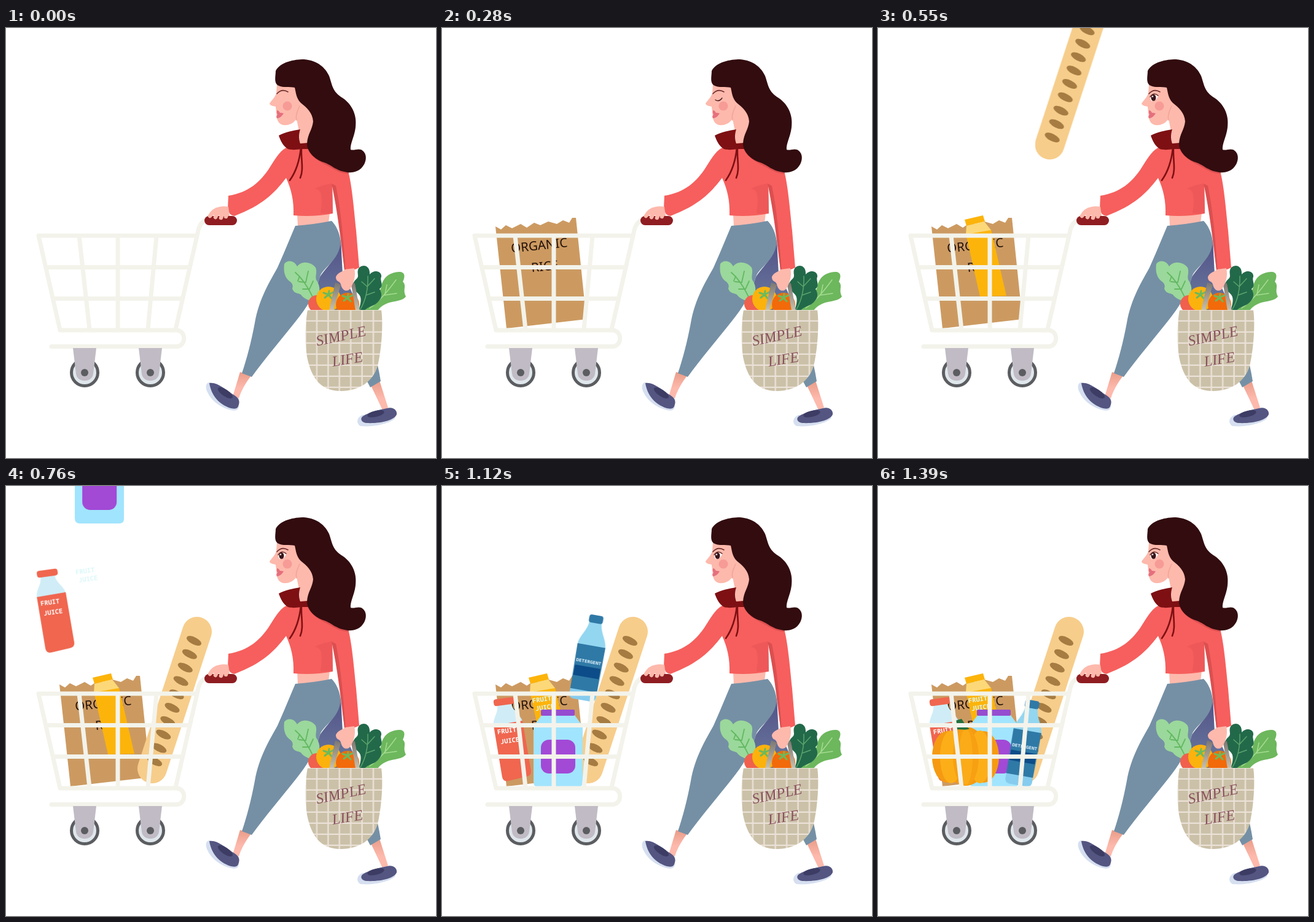
These frames come from a looping animation (700x700 px, 1.62 s). An HTML page:

```html
<!DOCTYPE html>
<html lang="en">
<head>
<meta charset="utf-8">
<title>Grocery shopping</title>
<style>
html, body { margin: 0; width: 100%; height: 100%; overflow: hidden; background: #fff; }
svg { display: block; width: 100vw; height: 100vh; }
text { text-anchor: middle; }

.skin { fill: #fdb9ac; }
.top { fill: #f65f5d; }
.top-dark { fill: #dc4f50; }
.bow { fill: #7e1013; }
.shoe { fill: #545581; }
.shoe-in { fill: #3c3c64; }
.sole { fill: #d5dff0; }
.line { fill: none; stroke-linecap: round; stroke-linejoin: round; }
.wire { stroke: #f3f3eb; stroke-width: 7; }
.mono { font-family: "Noto Sans Mono", monospace; font-weight: 600; }
.label { font-size: 10.5px; }
.hand { font-family: "Noto Sans", sans-serif; font-size: 20.5px; font-weight: 500; fill: #24120a; }
.script { font-family: "Liberation Serif", serif; font-style: italic; font-size: 24px; fill: #88505c; }

/* Each item drops in steps of 30 ms within the 1620 ms loop. */
.item, .eye { animation: 1620ms steps(7) infinite; }
.rice { animation-name: rice; }
.carton { animation-name: carton; }
.bread { animation-name: bread; animation-timing-function: steps(8); }
.bottle { animation-name: bottle; }
.pack { animation-name: pack; }
.soap { animation-name: soap; animation-timing-function: steps(11); }
.pumpkin { animation-name: pumpkin; animation-timing-function: steps(8); }
.eye { animation-timing-function: step-end; }
.closed { animation-name: closed; }
.open { animation-name: open; }

@keyframes rice {
  0%, 2.469% { transform: translate(0, -490px); }
  15.432%, to { transform: translate(0, 0); }
}
@keyframes carton {
  0%, 17.283% { transform: translate(0, -450px); }
  30.246%, to { transform: translate(0, 0); }
}
@keyframes bread {
  0%, 26.543% { transform: translate(83px, -540px); }
  41.358%, to { transform: translate(0, 0); }
}
@keyframes bottle {
  0%, 39.506% { transform: translate(-79px, -488px); }
  52.469%, to { transform: translate(0, 0); }
}
@keyframes pack {
  0%, 45.061% { transform: translate(-43px, -500.5px); }
  58.024%, to { transform: translate(0, 0); }
}
@keyframes soap {
  0%, 54.32% { transform: translate(0, -508px); }
  74.691%, to { transform: translate(0, 0); }
}
@keyframes pumpkin {
  0%, 70.987% { transform: translate(0, -489px); }
  85.802%, to { transform: translate(0, 0); }
}
@keyframes closed {
  0%, 24.691% { opacity: 0; }
  4.32% { opacity: 1; }
  to { opacity: 0; }
}
@keyframes open {
  0% { opacity: 0; }
  24.691%, to { opacity: 1; }
}
</style>
</head>
<body>
<svg viewBox="0 0 700 700">
  <defs>
    <linearGradient id="thigh" x1="0" y1="0" x2="0" y2="1">
      <stop offset=".05" stop-color="#55568a"/>
      <stop offset=".4" stop-color="#66749a"/>
      <stop offset=".8" stop-color="#7590a5"/>
    </linearGradient>
    <linearGradient id="ankle" x1="0" y1="0" x2="0" y2="1">
      <stop offset="0" stop-color="#e99c88"/>
      <stop offset=".6" stop-color="#fdb9ac"/>
    </linearGradient>
    <linearGradient id="strap" x1="0" y1="0" x2="0" y2="1">
      <stop offset="0" stop-color="#77736f"/>
      <stop offset="1" stop-color="#c9c0ae"/>
    </linearGradient>
    <pattern id="weave" x="489" y="460" width="18.4" height="18" patternUnits="userSpaceOnUse">
      <path fill="#cbc1a8" d="M0 0H18.4V18H0Z"/>
      <path fill="none" stroke="#ebe1d7" stroke-width="2.4" d="M0 17H18.4M17 0V18"/>
    </pattern>
    <g id="caster">
      <circle cx="128" cy="561" r="21.5" fill="#dfe7ec" stroke="#5b5d60" stroke-width="5"/>
      <path fill="#c0bbc4" d="M109 521H147L142 563C140 578 116 578 114 563Z"/>
      <circle cx="128" cy="561" r="6" fill="#5b5d60"/>
    </g>
    <g id="sprig">
      <path class="line" stroke="#6cba5b" stroke-width="3" d="M-8 -3L0 0L8 -4M-6 5L0 0L5 6M0 0L1 -6"/>
    </g>
  </defs>

  <!-- groceries -->
  <g class="item rice">
    <path fill="#cc9a61" d="M87 323L96 328L104 321L114 326L128 319L138 325L150 317L160 321L173 315L187 319L197 313L207 317L212 309L218 309L235 474L105 489Z"/>
    <text class="hand" transform="translate(159 361) rotate(-6)">ORGANIC</text>
    <text class="hand" transform="translate(168 395) rotate(-6)">RICE</text>
  </g>
  <g class="item bread">
    <path class="line" stroke="#f7cd8b" stroke-width="48" d="M311 237L238 460"/>
    <path id="cuts" fill="#a67c42"/>
  </g>
  <g class="item carton">
    <path fill="#fcb40b" d="M141 312L171 305L174 315L144 322ZM143 335L184 328L209 436L166 437Z"/>
    <path fill="#fcd878" d="M144 322L173 315L184 329L143 336Z"/>
  </g>
  <g class="item bottle">
    <path fill="#d0edf7" d="M90 357L113 353C114 366 128 372 131 383L84 391C82 378 92 370 90 357Z"/>
    <rect x="-17" y="-5.5" width="34" height="11" rx="4" fill="#f0664f" transform="translate(101 351) rotate(-8)"/>
    <path fill="#f0664f" d="M84 390L131 382L145 464Q146 471 138 473L108 480Q100 482 98 474Z"/>
    <g class="mono label" fill="#fff">
      <text transform="translate(106 402) rotate(-8)">FRUIT</text>
      <text transform="translate(111 418) rotate(-8)">JUICE</text>
    </g>
    <g class="mono label" fill="#dbf7f8">
      <text transform="translate(163 351) rotate(-8)">FRUIT</text>
      <text transform="translate(168 364) rotate(-8)">JUICE</text>
    </g>
  </g>
  <g class="item pack">
    <path fill="#a1e4fd" d="M162 373H216L229 391V482Q229 490 221 490H157Q149 490 149 482V391Z"/>
    <rect x="161" y="364" width="55" height="10" rx="2" fill="#964cd0"/>
    <rect x="161" y="413" width="56" height="55" rx="13" fill="#a249d6"/>
  </g>
  <g class="item soap">
    <g transform="translate(251 355) rotate(10)">
      <path fill="#93d6f0" d="M-10 5H10C11 22 22 30 23 45H-23C-22 30 -11 22 -10 5Z"/>
      <rect x="-11.5" y="-6" width="23" height="13" rx="4" fill="#2f79a6"/>
      <path fill="#2f79a6" d="M-23 44H23L22 119H-22Z"/>
      <path fill="#86ccee" d="M-22 118H22V127Q21 134 14 134H-14Q-21 134 -22 127Z"/>
      <rect x="-21" y="79" width="42" height="17" fill="#0c4c88"/>
      <text class="mono" y="73" font-size="7.6" fill="#e6f6ff">DETERGENT</text>
    </g>
  </g>
  <g class="item pumpkin">
    <g fill="#f59a12">
      <ellipse cx="113" cy="441" rx="25" ry="42"/>
      <ellipse cx="172" cy="441" rx="25" ry="42"/>
      <ellipse cx="143" cy="440" rx="36" ry="48"/>
    </g>
    <g fill="#fcae18">
      <ellipse cx="119" cy="441" rx="18" ry="43"/>
      <ellipse cx="166" cy="441" rx="18" ry="43"/>
    </g>
    <ellipse cx="143" cy="441" rx="21" ry="47" fill="#f7a012"/>
    <ellipse cx="143" cy="441" rx="11" ry="46" fill="#fbab18"/>
    <path fill="#23703f" d="M123 398C128 394 130 388 126 382L136 379C141 386 143 392 149 395C143 399 132 394 123 398Z"/>
  </g>

  <!-- cart -->
  <path class="line wire" d="M53 338H309M66 389.500H298M77 440.500H287M53 338L88 492H277C294 492 294 518.500 277 518.500H74M119 338L136 491M182 338V491M245 338L231 491M276 491L312 334Q315 315 327 313"/>
  <use href="#caster"/>
  <use href="#caster" x="107"/>
  <rect x="323" y="306" width="53" height="15" rx="7.5" fill="#8f1d21"/>

  <!-- legs -->
  <path fill="url(#ankle)" d="M594 582L608 574L622 618L613 622Z"/>
  <path class="sole" d="M580 630C570 635 570 644 577 648C596 650 622 645 633 636L636 625Z"/>
  <path class="shoe" d="M581 632C592 625 606 622 620 619C630 616 637 622 636 629C632 639 610 644 587 643C578 642 576 636 581 632Z"/>
  <ellipse class="shoe-in" rx="14" ry="5" transform="translate(602 628) rotate(-13)"/>
  <path fill="url(#thigh)" d="M545 345L548 400C575 450 602 520 610 575L593 585C570 540 520 470 500 440L511 405C525 385 540 375 545 345Z"/>
  <path fill="url(#ankle)" d="M381 560L399 566C390 578 383 590 379 603L369 600Z"/>
  <path class="sole" d="M331 577C325 578 324 585 328 593C335 608 350 618 366 622C374 624 379 622 379 615Z"/>
  <path class="shoe" d="M331 578C345 576 358 590 372 598C378 602 381 606 379 613C377 621 373 620 366 619C350 614 335 602 331 578Z"/>
  <ellipse class="shoe-in" rx="14" ry="5.500" transform="translate(357 594) rotate(33)"/>
  <path class="skin" d="M474 303L527 301L525 318L475 323Z"/>
  <path fill="#7590a5" d="M471 322Q500 320 530 314C537 321 543 332 545 348C542 380 517 388 511 405C505 430 490 455 472 477C450 505 420 540 400 568L384 562C392 538 399 512 405 480C412 440 430 412 442 390C455 361 464 338 471 322Z"/>

  <!-- head -->
  <path class="skin" d="M441 92L440 106C438 113 432 118 429 123C430 127 436 127 439 128L440 137L441 147C443 155 448 159 457 158C465 157 470 152 473 148L477 168L478 192H495L502 150L480 92Z"/>
  <path class="line" stroke="#f2a498" stroke-width="1.500" d="M478 127C474 136 471 142 473 150"/>
  <circle cx="458" cy="127" r="7.500" fill="#f79b97"/>
  <path fill="#e56f7d" d="M441 134Q444 134 446 138Q449 138 452 139Q447 147 441 147Q439 144 442 141Q440 138 441 134Z"/>
  <path class="line" stroke="#6b2b2b" stroke-width="1.600" d="M441 107Q449 98 459 104"/>
  <path class="line eye closed" stroke="#4a1c1c" stroke-width="1.400" d="M445 117Q451 121 456 114"/>
  <g class="eye open">
    <path fill="#fff" d="M443 114Q448 106 456 111Q453 119 445 119Z"/>
    <ellipse cx="448.500" cy="113.500" rx="4" ry="5.200" fill="#37141a"/>
    <circle cx="447" cy="111.500" r="1.200" fill="#fff"/>
    <path class="line" stroke="#4a1c1c" stroke-width="1.300" d="M443 112Q449 104 456 110"/>
  </g>

  <!-- sweater -->
  <path class="top" d="M459 194C470 200 485 196 495 192L520 212L557 233C563 255 566 290 570 330L575 390Q564 396 551 394C547 350 541 305 531 253L532 302Q500 308 468 305C469 280 464 262 456 244C436 270 418 288 372 306Q363 305 361 295L362 273C395 268 415 250 430 226C440 210 448 197 459 194Z"/>
  <path fill="#ee5859" d="M531 253C516 256 508 258 503 262C514 262 516 275 512 302L532 302Z"/>
  <path class="top-dark" d="M530 253L537 257C546 300 549 345 553 394L551 394C545 345 540 300 530 253ZM490 195C500 217 522 222 532 229C542 235 550 237 558 237L556 230L510 200Z"/>
  <path class="bow" d="M444 175C455 169 468 167 479 165C476 174 477 182 479 188L491 187L495 197L480 197C474 198 466 199 459 197C451 192 447 184 444 175Z"/>
  <path class="line" stroke="#7e1013" stroke-width="2.600" d="M480 195C478 215 472 234 462 248M481 195C480 215 485 230 479 244"/>
  <path fill="#320c0f" d="M439 70C446 55 470 51 485 51C508 53 520 65 526 78C531 92 531 102 545 112C562 122 572 140 569 162C567 178 560 188 561 198C566 200 572 196 578 198C588 203 587 215 583 222C577 233 566 236 556 235C535 232 530 222 515 218C500 212 490 200 490 188C491 172 499 165 500 152C499 138 490 130 480 122C472 114 472 104 470 97C462 95 450 98 442 93C436 88 439 78 439 70Z"/>

  <!-- hand on the cart -->
  <path class="skin" d="M362 291C350 288 334 293 330 304L364 306Z"/>
  <path class="line" stroke="#fdb9ac" stroke-width="6.500" d="M338 299L332 306M345 299L341 308M353 300L350 309M360 300L358 307"/>

  <!-- vegetables and bag -->
  <path fill="#9bd89b" d="M453 384C458 377 469 378 474 388C481 379 496 380 504 390C507 398 503 403 505 410C513 420 512 436 503 445C493 444 485 441 480 434C475 431 468 432 466 424C468 419 466 415 460 411C452 403 452 393 453 384Z"/>
  <path class="line" stroke="#63b862" stroke-width="1.800" d="M471 398Q488 413 501 442M478 404L475 412M488 414L492 396M488 414L477 413M494 425L500 412M494 425L483 425"/>
  <path fill="#6db75d" d="M576 460C590 445 600 435 610 425C612 408 622 398 640 397C650 397 650 405 646 413C653 420 645 426 651 437C643 449 620 440 605 460Z"/>
  <path class="line" stroke="#a5dc91" stroke-width="1.500" d="M592 456Q612 442 635 410M617 433L620 418M615 435L636 432"/>
  <path fill="#22694a" d="M574 460C578 447 580 438 573 432C564 425 563 414 570 409C577 404 569 398 575 390C582 384 593 387 592 401C600 392 612 396 611 405C608 412 616 418 608 425C615 436 609 444 601 450C593 454 587 455 584 460Z"/>
  <path class="line" stroke="#5ca46c" stroke-width="1.500" d="M577 458Q590 435 589 404M588 421L579 413M588 421L600 408M586 435L600 430"/>
  <circle cx="506" cy="449" r="14" fill="#f0604d"/>
  <circle cx="525" cy="441" r="20" fill="#fbb20d"/>
  <circle cx="556" cy="450" r="19" fill="#f26a0a"/>
  <use href="#sprig" x="525" y="434"/>
  <use href="#sprig" x="556" y="439"/>
  <path fill="url(#strap)" d="M536 414L545 418L533 460H526ZM561 412L568 416L576 460H569Z"/>
  <path class="skin" d="M552 393L567 391C570 405 566 415 560 425C555 430 547 428 545 417C543 411 537 414 537 405C541 397 548 397 552 393Z"/>
  <path fill="url(#weave)" d="M491 459H611C614 480 612 520 605 550C598 575 575 591 545 591C512 591 497 570 490 535C486 510 487 480 491 459Z"/>
  <text class="script" transform="translate(547 509) rotate(-12)">SIMPLE</text>
  <text class="script" transform="translate(557 547) rotate(-9)">LIFE</text>
</svg>
<script>
const cut = (_, i) =>
  `M${306 - 7.1 * i - 11.5} ${252 + 21.8 * i - 6}a13 5.500 27 1 1 23 12a13 5.500 27 1 1 -23 -12Z`;
document.getElementById("cuts").setAttribute("d", Array.from({ length: 10 }, cut).join(""));
</script>
</body>
</html>
```
